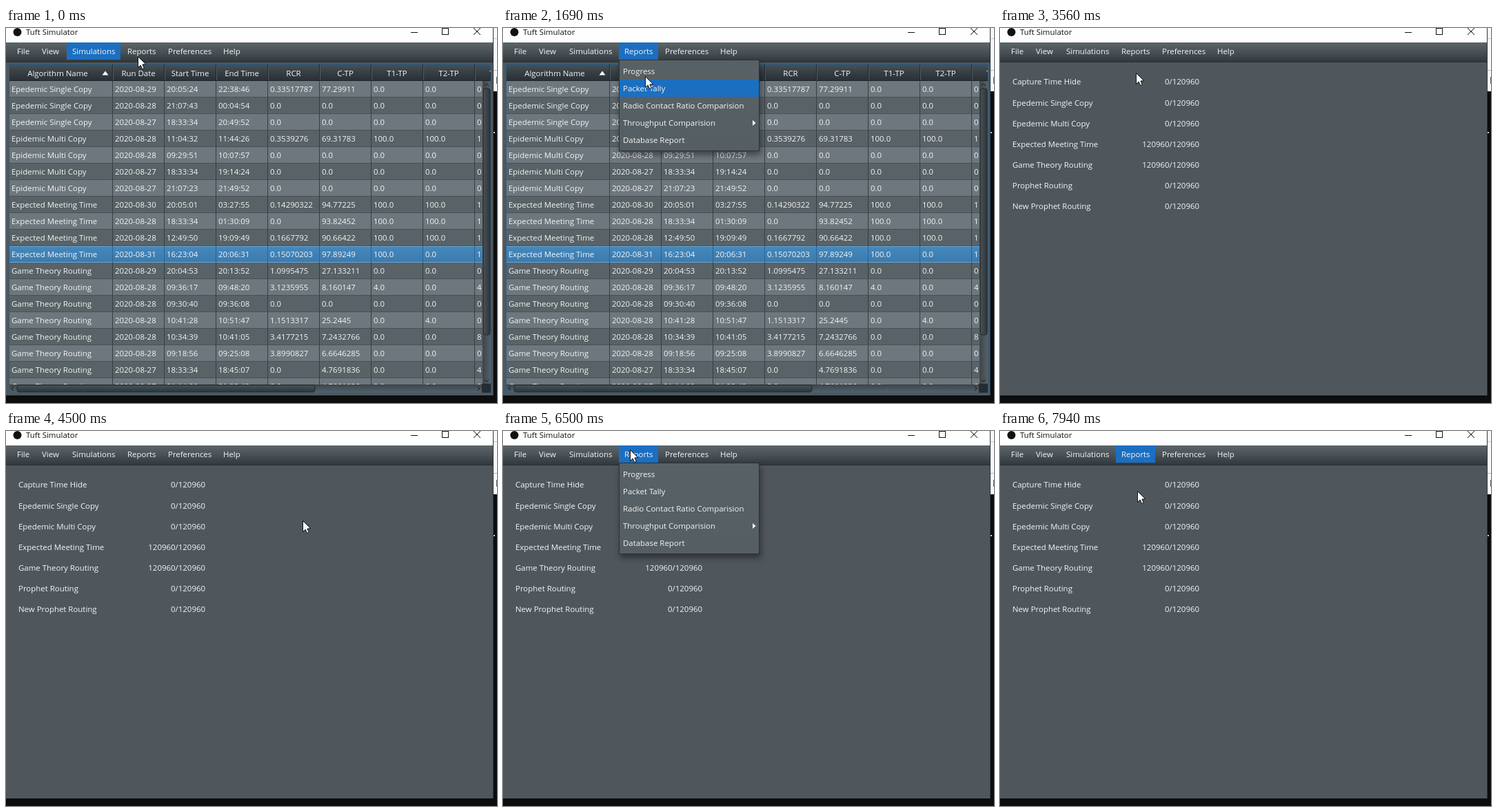
Write an HTML page with a canvas that moves like this. It is 712x545 px and loops after 8000 ms.

```html
<!DOCTYPE html>
<html lang="en">
<head>
<meta charset="utf-8">
<title>Tuft Simulator</title>
<style>
  html, body { margin: 0; width: 100%; height: 100%; overflow: hidden; background: #0b0d0f; }
  canvas { display: block; }
</style>
</head>
<body>
<canvas id="stage" width="712" height="545"></canvas>
<script>
const ctx = document.getElementById('stage').getContext('2d');
const LOOP = 8000;
const FONT = '11.45px "Open Sans", "Noto Sans", sans-serif';
const BLUE = '#1c6fc0';

const menus = [['File', 16], ['View', 52], ['Simulations', 96], ['Reports', 176], ['Preferences', 235], ['Help', 315]];
const reportItems = ['Progress', 'Packet Tally', 'Radio Contact Ratio Comparision', 'Throughput Comparision', 'Database Report'];
const columns = [5, 155, 230, 305, 380, 455, 530, 605, 680];
const headers = ['Algorithm Name', 'Run Date', 'Start Time', 'End Time', 'RCR', 'C-TP', 'T1-TP', 'T2-TP'];
const runs = `Epedemic Single Copy|2020-08-29|20:05:24|22:38:46|0.33517787|77.29911|0.0|0.0|0
Epedemic Single Copy|2020-08-28|21:07:43|00:04:54|0.0|0.0|0.0|0.0|0
Epedemic Single Copy|2020-08-27|18:33:34|20:49:52|0.0|0.0|0.0|0.0|0
Epidemic Multi Copy|2020-08-28|11:04:32|11:44:26|0.3539276|69.31783|100.0|100.0|1
Epidemic Multi Copy|2020-08-28|09:29:51|10:07:57|0.0|0.0|0.0|0.0|0
Epidemic Multi Copy|2020-08-27|18:33:34|19:14:24|0.0|0.0|0.0|0.0|0
Epidemic Multi Copy|2020-08-27|21:07:23|21:49:52|0.0|0.0|0.0|0.0|0
Expected Meeting Time|2020-08-30|20:05:01|03:27:55|0.14290322|94.77225|100.0|100.0|1
Expected Meeting Time|2020-08-28|18:33:34|01:30:09|0.0|93.82452|100.0|100.0|1
Expected Meeting Time|2020-08-28|12:49:50|19:09:49|0.1667792|90.66422|100.0|100.0|1
Expected Meeting Time|2020-08-31|16:23:04|20:06:31|0.15070203|97.89249|100.0|0.0|1
Game Theory Routing|2020-08-29|20:04:53|20:13:52|1.0995475|27.133211|0.0|0.0|0
Game Theory Routing|2020-08-28|09:36:17|09:48:20|3.1235955|8.160147|4.0|0.0|4
Game Theory Routing|2020-08-28|09:30:40|09:36:08|0.0|0.0|0.0|0.0|0
Game Theory Routing|2020-08-28|10:41:28|10:51:47|1.1513317|25.2445|0.0|4.0|0
Game Theory Routing|2020-08-28|10:34:39|10:41:05|3.4177215|7.2432766|0.0|0.0|8
Game Theory Routing|2020-08-28|09:18:56|09:25:08|3.8990827|6.6646285|0.0|0.0|0
Game Theory Routing|2020-08-27|18:33:34|18:45:07|0.0|4.7691836|0.0|0.0|4
Game Theory Routing|2020-08-27|21:14:09|21:23:42|0.0|4.7691836|0.0|0.0|0`
  .split('\n').map(line => line.split('|'));
const SELECTED = 10;
const progress = [['Capture Time Hide', 0], ['Epedemic Single Copy', 0], ['Epedemic Multi Copy', 0],
  ['Expected Meeting Time', 120960], ['Game Theory Routing', 120960], ['Prophet Routing', 0], ['New Prophet Routing', 0]];

// [time, x, y]: the pointer jumps between these, as in a low-rate recording.
const pointer = [[0, 191, 41], [880, 192, 75], [1130, 194, 83], [1560, 197, 79], [1640, 206, 70], [1730, 217, 61],
  [1810, 228, 55], [2130, 230, 68], [2310, 197, 65], [3690, 270, 86], [3810, 390, 120], [3940, 462, 140],
  [4500, 430, 130], [4610, 365, 106], [4720, 295, 80], [4830, 238, 58], [4940, 205, 46], [5130, 184, 27],
  [6630, 186, 35], [6750, 190, 48], [6830, 194, 59], [6940, 197, 68], [7190, 198, 80], [7310, 199, 87]];
// [time, highlighted menu, popup open, highlighted item]
const menuStates = [[0, 2, false, -1], [130, 3, true, -1], [1560, 3, true, 1], [2130, 3, true, 0],
  [3560, -1, false, -1], [6500, 3, true, -1], [6830, 3, true, 0], [7190, 3, true, 1], [7940, 3, false, -1]];

const stateAt = (list, t) => list.findLast(entry => entry[0] <= t);

function box(x, y, w, h, fill) {
  ctx.fillStyle = fill;
  ctx.fillRect(x, y, w, h);
}

function frame(x, y, w, h, color) {
  ctx.strokeStyle = color;
  ctx.lineWidth = 1;
  ctx.strokeRect(x + .5, y + .5, w - 1, h - 1);
}

function label(text, x, middle, align = 'left', color = '#f4f5f5') {
  ctx.textAlign = align;
  ctx.fillStyle = color;
  ctx.fillText(text, x, middle + 4);
}

function shade(x0, y0, x1, y1, ...colors) {
  const g = ctx.createLinearGradient(x0, y0, x1, y1);
  colors.forEach((c, i) => g.addColorStop(i / (colors.length - 1), c));
  return g;
}

function polygon(fill, ...points) {
  ctx.beginPath();
  points.forEach(([x, y]) => ctx.lineTo(x, y));
  ctx.closePath();
  ctx.fillStyle = fill;
  ctx.fill();
}

function line(color, ...points) {
  ctx.beginPath();
  points.forEach(([x, y]) => ctx.lineTo(x, y));
  ctx.strokeStyle = color;
  ctx.lineWidth = 1;
  ctx.stroke();
}

function clipped(x, y, w, h, draw) {
  ctx.save();
  ctx.beginPath();
  ctx.rect(x, y, w, h);
  ctx.clip();
  draw();
  ctx.restore();
}

function drawDesktop() {
  box(0, 0, 712, 545, '#0b0d0f');
  box(707, 0, 5, 92, '#fafafa');
  box(707, 15, 5, 1, '#c8c8c8');
  box(707, 61, 5, 1, '#b8b8b8');
  box(711, 71, 1, 10, '#555');
  box(707, 151, 2, 2, '#d0d0d0');
  box(0, 0, 706, 534, '#50575c');
  box(706, 0, 1, 534, '#30363a');
}

function drawTitleBar() {
  box(0, 0, 706, 21, '#fefefe');
  ctx.beginPath();
  ctx.arc(16.5, 6, 6, 0, 7);
  ctx.fillStyle = '#111';
  ctx.fill();
  label('Tuft Simulator', 29, 6, 'left', '#111');
  box(587, 6, 10, 1, '#111');
  frame(632, 0, 10, 10, '#111');
  line('#111', [678, 0], [688, 10]);
  line('#111', [688, 0], [678, 10]);
}

function drawMenuBar(active) {
  box(0, 21, 706, 29, shade(0, 21, 0, 50, '#5c656a', '#485055', '#30373c'));
  box(0, 49, 706, 1, '#292f33');
  if (active === 2) box(88, 21, 78, 25, BLUE);
  if (active === 3) box(168, 21, 57, 25, BLUE);
  menus.forEach(([name, x]) => label(name, x, 34));
}

function drawRow(cells, i) {
  const y = 77 + 24 * i;
  const selected = i === SELECTED;
  box(5, y, 686, 24, selected ? shade(0, y, 0, y + 24, '#4788bb', '#3a7bb0') : i % 2 ? '#596267' : '#6e777d');
  box(5, y + 23, 686, 1, selected ? '#67a5d3' : '#495156');
  if (selected) box(5, y, 686, 1, '#67a5d3');
  columns.slice(1).forEach(x => box(x - 1, y, 1, 24, selected ? '#2c648f' : '#363e43'));
  cells.forEach((cell, c) => label(cell, columns[c] + 3, y + 12));
}

function drawScrollbars() {
  box(691, 77, 12, 441, shade(691, 0, 703, 0, '#3d454a', '#576065'));
  box(5, 518, 686, 12, shade(0, 518, 0, 530, '#3d454a', '#576065'));
  box(690, 517, 13, 13, '#262c30');
  ctx.beginPath();
  ctx.roundRect(692, 88, 10, 358, 3);
  ctx.fillStyle = shade(692, 0, 702, 0, '#4a5257', '#2e353a');
  ctx.fill();
  ctx.strokeStyle = '#22282c';
  ctx.stroke();
  ctx.beginPath();
  ctx.roundRect(16, 519, 432, 10, 3);
  ctx.fillStyle = shade(0, 519, 0, 529, '#4a5257', '#2e353a');
  ctx.fill();
  ctx.stroke();
  line('#14181b', [694, 84], [697, 81], [700, 84]);
  line('#14181b', [694, 511], [697, 514], [700, 511]);
  line('#14181b', [11, 521], [8, 524], [11, 527]);
  line('#14181b', [684, 521], [687, 524], [684, 527]);
}

function drawTable() {
  clipped(5, 77, 686, 441, () => runs.forEach(drawRow));
  box(5, 53, 698, 24, shade(0, 53, 0, 77, '#485157', '#363e43', '#293035'));
  box(5, 76, 698, 1, '#1f2529');
  headers.forEach((name, c) => {
    label(name, c ? (columns[c] + columns[c + 1] - 1) / 2 : 75, 66, 'center');
    box(columns[c + 1] - 1, 53, 1, 24, '#20272b');
    box(columns[c + 1], 54, 1, 22, '#535d62');
  });
  clipped(680, 53, 23, 24, () => label('T3-TP', 701, 66));
  polygon('#fff', [139.5, 68.5], [144, 62.5], [148.5, 68.5]);
  drawScrollbars();
  frame(4, 52, 700, 479, '#24608f');
}

function drawProgress() {
  progress.forEach(([name, done], i) => {
    const y = i ? 79 + 30 * i : 78;
    label(name, 18, y);
    label(done + '/120960', 289, y, 'right');
  });
}

function drawPopup(hovered) {
  ctx.save();
  ctx.shadowColor = 'rgba(0,0,0,.45)';
  ctx.shadowBlur = 9;
  ctx.shadowOffsetX = 2;
  ctx.shadowOffsetY = 5;
  box(168, 47, 204, 132, '#565f63');
  ctx.restore();
  box(168, 47, 204, 132, shade(0, 47, 0, 179, '#586165', '#555e62'));
  frame(168, 46, 204, 133, '#2b3237');
  if (hovered >= 0) box(169, 50 + 25 * hovered, 202, 25, BLUE);
  reportItems.forEach((name, i) => label(name, 174, 63 + 25 * i));
  polygon('#fff', [362, 134], [366.5, 138], [362, 142]);
}

function drawPointer(x, y) {
  ctx.save();
  ctx.translate(x + .5, y + .5);
  polygon('#fff', [0, 0], [0, 16], [3.7, 12.6], [6.2, 18], [8.8, 16.9], [6.4, 11.5], [11.3, 11.3]);
  ctx.strokeStyle = '#111';
  ctx.lineWidth = 1;
  ctx.stroke();
  ctx.restore();
}

function render(t) {
  const [, activeMenu, popupOpen, hovered] = stateAt(menuStates, t);
  const [, x, y] = stateAt(pointer, t);
  ctx.font = FONT;
  drawDesktop();
  drawTitleBar();
  drawMenuBar(activeMenu);
  if (t < 3560) drawTable();
  else drawProgress();
  if (popupOpen) drawPopup(hovered);
  drawPointer(x, y);
}

const start = performance.now();
function tick() {
  render((performance.now() - start) % LOOP);
  requestAnimationFrame(tick);
}
tick();
</script>
</body>
</html>
```
